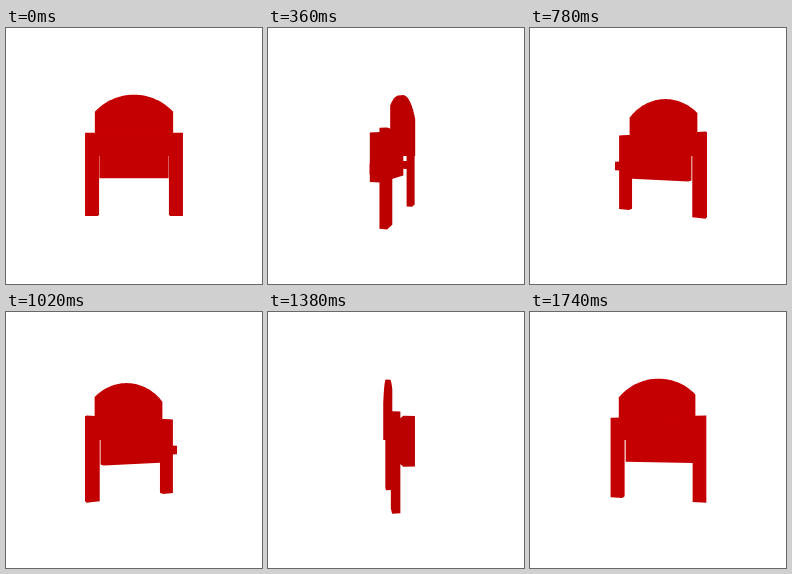
Animation of 256x256 px, one loop 1.8 s. Source, as an HTML page with a canvas:

```html
<!DOCTYPE html>
<html lang="en">
<head>
<meta charset="utf-8">
<title>Turning chair</title>
<style>
html, body { margin: 0; width: 100%; height: 100%; overflow: hidden; background: #fff; }
canvas { display: block; width: 256px; height: 256px; }
</style>
</head>
<body>
<canvas id="stage" width="256" height="256"></canvas>
<script>
const ctx = document.getElementById('stage').getContext('2d');
const SIZE = 256, MID = SIZE / 2;
const LOOP = 1800, STEP = 60;
const CAMERA = 222;

// Sweep a flat [x, y] outline between two depths.
function prism(outline, z0, z1) {
  return outline.flatMap(([x, y]) => [[x, y, z0], [x, y, z1]]);
}

function box(x0, x1, y0, y1, z0, z1) {
  return prism([[x0, y0], [x1, y0], [x1, y1], [x0, y1]], z0, z1);
}

// Panel with a circular-arc top.
function archedBack(half, top, shoulder, bottom) {
  const rise = shoulder - top;
  const r = (half * half + rise * rise) / (2 * rise);
  const spread = Math.asin(half / r);
  const pts = [[-half, bottom], [half, bottom]];
  for (let i = 0; i <= 32; i++) {
    const a = spread * (i / 16 - 1);
    pts.push([r * Math.sin(a), top + r - r * Math.cos(a)]);
  }
  return pts;
}

const parts = [
  prism(archedBack(37.2, -58.3, -42, 0), 7, 11),
  box(-35, 35, -20.4, 22.6, -12.5, -2.5)
];
for (const s of [-1, 1]) {
  parts.push(box(s * 34.7, s * 47.2, -22.5, 57.8, 1.5, 8));
  parts.push(box(s * 39, s * 46.3, 6, 15, -7.5, 4));
}

function project([x, y, z], cos, sin) {
  const k = CAMERA / (CAMERA + x * sin - z * cos);
  return [MID + (x * cos + z * sin) * k, MID + y * k];
}

function halfHull(pts) {
  const out = [];
  for (const p of pts) {
    while (out.length > 1) {
      const [a, b] = out.slice(-2);
      if ((b[0] - a[0]) * (p[1] - a[1]) - (b[1] - a[1]) * (p[0] - a[0]) > 0) break;
      out.pop();
    }
    out.push(p);
  }
  return out.slice(0, -1);
}

function hull(pts) {
  pts.sort((a, b) => a[0] - b[0] || a[1] - b[1]);
  const lower = halfHull(pts);
  return lower.concat(halfHull(pts.reverse()));
}

function draw(time) {
  const angle = Math.floor((time % LOOP) / STEP) * STEP / LOOP * 2 * Math.PI;
  const cos = Math.cos(angle), sin = Math.sin(angle);
  ctx.fillStyle = '#fff';
  ctx.fillRect(0, 0, SIZE, SIZE);
  ctx.fillStyle = `rgb(${Math.round(187 + 10 * cos * cos)}, 0, 0)`;
  for (const part of parts) {
    ctx.beginPath();
    for (const [x, y] of hull(part.map(p => project(p, cos, sin)))) ctx.lineTo(x, y);
    ctx.closePath();
    ctx.fill();
  }
}

const start = performance.now();
function tick() {
  draw(performance.now() - start);
  requestAnimationFrame(tick);
}
tick();
</script>
</body>
</html>
```
